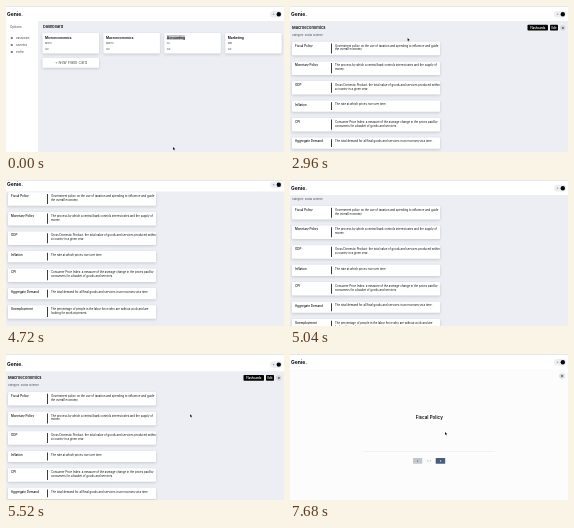
Recreate the animation shown at these times as an HTML page with a canvas. Size 278 by 146 pixels, loop 8 s.

```html
<!DOCTYPE html>
<html lang="en">
<head>
<meta charset="utf-8">
<title>Flash cards</title>
<style>
  html, body { margin: 0; width: 100%; height: 100%; overflow: hidden; background: #fff; }
  canvas { display: block; width: 278px; height: 146px; }
</style>
</head>
<body>
<canvas id="stage"></canvas>
<script>
const W = 278, H = 146, LOOP = 8000;
const canvas = document.getElementById('stage');
const ratio = window.devicePixelRatio || 1;
canvas.width = W * ratio;
canvas.height = H * ratio;
const ctx = canvas.getContext('2d');

const INK = '#08090b', SOFT = '#3c4047', PAGE = '#eceef3';
const MAX_SCROLL = 20;

const decks = [
  ['Microeconomics', 'Micro'],
  ['Macroeconomics', 'Macro'],
  ['Accounting', 'Ac'],
  ['Marketing', 'Mkt']
];

const terms = [
  ['Fiscal Policy', 'Government policy on the use of taxation and spending to influence and guide', 'the overall economy.'],
  ['Monetary Policy', 'The process by which a central bank controls interest rates and the supply of', 'money.'],
  ['GDP', 'Gross Domestic Product: the total value of goods and services produced within', 'a country in a given year.'],
  ['Inflation', 'The rate at which prices rise over time.'],
  ['CPI', 'Consumer Price Index: a measure of the average change in the prices paid by', 'consumers for a basket of goods and services.'],
  ['Aggregate Demand', 'The total demand for all final goods and services in an economy at a time.'],
  ['Unemployment', 'The percentage of people in the labor force who are without a job and are', 'looking for work at present.']
];

// Times, then x and y of the pointer
const pointerPath = [
  [0, 167, 141], [240, 167, 141], [1040, 163, 33], [1440, 161, 33],
  [1680, 113, 32], [2880, 113, 32], [2960, 117.5, 32], [3440, 172, 58],
  [4000, 172, 58], [4240, 168, 70], [5360, 168, 70], [6160, 248, 21],
  [6640, 247, 21], [7360, 247, 21], [7680, 155, 78]
];

const scrollPath = [
  [4400, 0], [4560, -11], [4720, -23.5], [4960, -20], [5120, 0],
  [5200, 4.5], [5360, 3.6], [5680, 1], [6080, 0]
];

function along(path, t) {
  if (t <= path[0][0]) return path[0].slice(1);
  for (let i = 1; i < path.length; i++) {
    const a = path[i - 1], b = path[i];
    if (t <= b[0]) {
      const k = (t - a[0]) / (b[0] - a[0]);
      return a.slice(1).map((v, j) => v + (b[j + 1] - v) * k);
    }
  }
  return path[path.length - 1].slice(1);
}

function box(x, y, w, h, color, radius = 0) {
  ctx.fillStyle = color;
  ctx.beginPath();
  ctx.roundRect(x, y, w, h, radius);
  ctx.fill();
}

function card(x, y, w, h) {
  ctx.save();
  ctx.shadowColor = 'rgba(40,45,60,.2)';
  ctx.shadowBlur = 3 * ratio;
  ctx.shadowOffsetY = ratio;
  box(x, y, w, h, '#fff', 1);
  ctx.restore();
}

function text(str, x, y, size, weight = 400, color = INK, align = 'left') {
  ctx.font = `${weight} ${size}px Inter, sans-serif`;
  ctx.textAlign = align;
  ctx.textBaseline = 'middle';
  ctx.fillStyle = color;
  ctx.fillText(str, x, y);
}

function dot(x, y, r, color) {
  ctx.fillStyle = color;
  ctx.beginPath();
  ctx.arc(x, y, r, 0, Math.PI * 2);
  ctx.fill();
}

function closeButton(x, y) {
  dot(x, y, 2.8, '#d5d8de');
  text('×', x, y, 4, 500, INK, 'center');
}

function header(y) {
  box(0, 0, W, 15 + y, '#fff');
  text('Genie.', 1, 8.3 + y, 5, 700);
  box(264, 5 + y, 12, 6.6, '#eceef2', 3.3);
  dot(267.6, 8.3 + y, 0.8, '#9a9da5');
  dot(272.8, 8.3 + y, 2.2, INK);
}

function dashboard(t) {
  box(33, 15, W - 33, H - 15, PAGE);
  box(32.5, 15, 0.5, H - 15, '#dfe1e6');
  text('Options', 4, 21.5, 3.2, 400, SOFT);
  ['Dashboard', 'Favorites', 'Profile'].forEach((label, i) => {
    const y = 32 + i * 7;
    box(4.8, y - 1, 2, 2, '#777b83', 0.6);
    text(label, 10, y, 2.6, 400, SOFT);
  });
  text('Dashboard', 37, 21.3, 3.8, 600);
  decks.forEach(([name, topic], i) => {
    const x = 36.5 + i * 60.9;
    card(x, 27, 56.5, 20.5);
    if (i === 2) box(x + 2.5, 29, 18, 5, t < 1280 ? '#c9c9c9' : '#a9c4ed');
    text(name, x + 2.5, 31.6, 3.3, 600);
    text(topic, x + 2.5, 37.3, 2.5, 400, SOFT);
    text('Go', x + 2.5, 43.4, 2.7, 400, SOFT);
  });
  card(36.5, 52, 56.5, 9.8);
  text('+ New Flash Card', 65, 57.1, 3.8, 400, '#555860', 'center');
}

function deckPage(t) {
  const [scroll] = along(scrollPath, t);
  const bounce = scroll > 0 ? scroll : Math.min(0, scroll + MAX_SCROLL);
  box(0, 0, W, H, PAGE);
  ctx.save();
  ctx.translate(0, scroll);
  text('Macroeconomics', 2, 21.5, 4, 600);
  text('Category: Social Science', 2, 29.3, 2.6, 400, SOFT);
  box(237.5, 18.8, 20.5, 5.7, t > 6080 ? '#25272c' : '#050505', 0.7);
  text('Flashcards', 247.8, 21.7, 2.9, 600, '#fff', 'center');
  box(260, 18.8, 8, 5.7, '#050505', 0.7);
  text('Edit', 264, 21.7, 2.8, 600, '#fff', 'center');
  closeButton(272.8, 21.7);
  if (t >= 1920) {
    let y = 35.8;
    for (const [term, ...lines] of terms) {
      const h = lines.length > 1 ? 13.5 : 11.2;
      card(2, y, 148, h);
      text(term, 5, y + 4, 3, 500);
      box(41, y + 1.7, 0.8, h - 3.4, INK);
      lines.forEach((line, i) => text(line, 45, y + 4 + i * 3.8, 2.8));
      y += h + 6.1;
    }
  }
  ctx.restore();
  header(bounce);
}

function studyPage(t) {
  box(0, 15, W, H - 15, '#fcfcfd');
  closeButton(272, 22);
  box(73, 97.2, 132, 0.9, '#eceef0', 0.4);
  if (t >= 6880) text(terms[0][0], 139.3, 63.4, 4.5, 600, INK, 'center');
  box(123, 104, 9.3, 5.8, '#c3c7d0', 0.6);
  text('‹', 127.6, 106.6, 4, 600, '#555c6b', 'center');
  text('1 / 7', 138.8, 107, 2.5, 400, '#858991', 'center');
  box(145.7, 104, 9.5, 5.8, '#4a5d7c', 0.6);
  text('›', 150.5, 106.6, 4, 600, '#fff', 'center');
}

function pointer(t) {
  const scrolling = t >= 4400 && t < 5360;
  if (scrolling) return;
  const [x, y] = along(pointerPath, t);
  ctx.save();
  ctx.translate(x, y);
  if (t >= 1000 && t < 1500) {
    box(0, -1.5, 0.5, 3, '#30343b');
  } else {
    ctx.beginPath();
    [[0, 0], [0, 2.9], [0.7, 2.3], [1.2, 3.4], [1.7, 3.1], [1.2, 2.1], [2.1, 2]]
      .forEach(p => ctx.lineTo(...p));
    ctx.closePath();
    ctx.fillStyle = '#111';
    ctx.fill();
  }
  ctx.restore();
}

function draw(now) {
  const t = now % LOOP;
  ctx.setTransform(ratio, 0, 0, ratio, 0, 0);
  box(0, 0, W, H, '#fff');
  if (t < 1840) {
    dashboard(t);
    header(0);
  } else if (t < 6800) {
    deckPage(t);
  } else {
    studyPage(t);
    header(0);
  }
  box(0, 0, W, 1, '#e6e7e9');
  pointer(t);
}

const start = performance.now();
function tick() {
  draw(performance.now() - start);
  requestAnimationFrame(tick);
}
tick();
</script>
</body>
</html>
```
